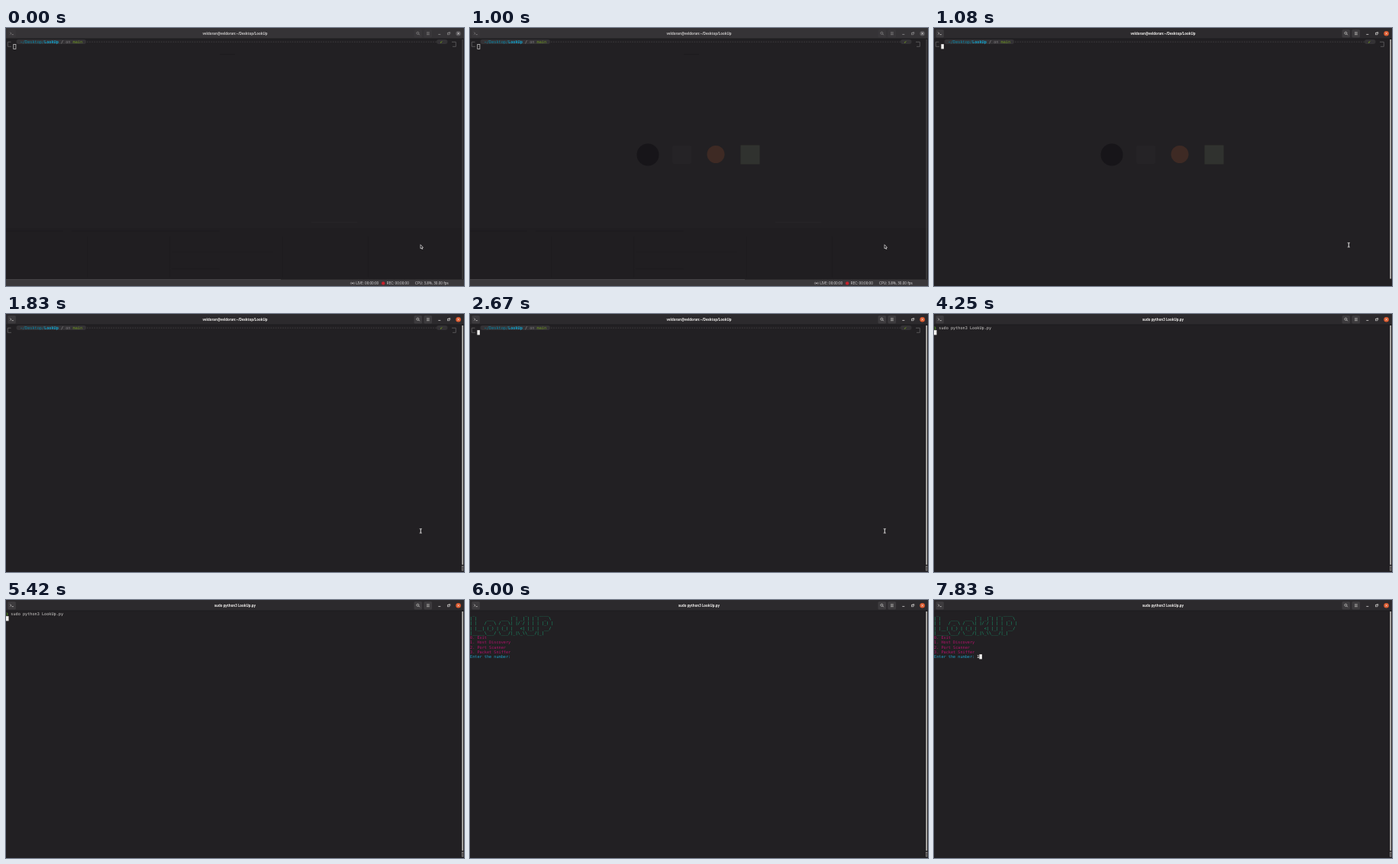
Write an HTML page with a canvas that moves like this. It is 600x338 px and loops after 8 s.

```html
<!DOCTYPE html>
<html lang="en">
<head>
<meta charset="utf-8">
<title>Terminal session</title>
<style>
  html, body { margin: 0; width: 600px; height: 338px; overflow: hidden; background: #222023; }
  canvas { display: block; }
</style>
</head>
<body>
<canvas id="stage" width="600" height="338"></canvas>
<script>
const ctx = document.getElementById('stage').getContext('2d');
const LOOP = 8000;
const CELL_W = 3.125, CELL_H = 6.25, TOP = 14.9;
const BG = '#222023', WHITE = '#e4e2e0';
const MONO = '5.19px "DejaVu Sans Mono", monospace';

// Moments of the session, in ms
const T = { focus: 1080, popup: 1000, popupGone: 1330, hideMouse: 2830,
            command: 3500, enter: 4170, menu: 5670, answer: 7830 };

const BANNER = [
  ' _                _    _   _ ____'.replace(/^ _ {16}/, ' _' + ' '.repeat(16)),
  '| |    ___   ___ | | _| | | |  _ \\',
  '| |   / _ \\ / _ \\| |/ / | | | |_) |',
  '| |__| (_) | (_) |   <| |_| |  __/',
  '|_____\\___/ \\___/|_|\\_\\\\___/|_|'
];
const MENU = ['0. Exit', '1. Host Discovery', '2. Port Scanner', '3. Packet Sniffer'];
const COMMAND = 'sudo python3 LookUp.py';

function rect(x, y, w, h, color) {
  ctx.fillStyle = color;
  ctx.fillRect(x, y, w, h);
}

function round(x, y, w, h, r, color) {
  ctx.fillStyle = color;
  ctx.beginPath();
  ctx.roundRect(x, y, w, h, r);
  ctx.fill();
}

function disc(x, y, r, color) {
  ctx.fillStyle = color;
  ctx.beginPath();
  ctx.arc(x, y, r, 0, Math.PI * 2);
  ctx.fill();
}

function line(color, width, ...points) {
  ctx.strokeStyle = color;
  ctx.lineWidth = width;
  ctx.beginPath();
  for (let i = 0; i < points.length; i += 2) ctx.lineTo(points[i], points[i + 1]);
  ctx.stroke();
}

function label(text, x, y, font, color, align = 'left') {
  ctx.font = font;
  ctx.fillStyle = color;
  ctx.textAlign = align;
  ctx.fillText(text, x, y);
}

// Writes text on the terminal grid
function write(text, col, row, color, bold = false) {
  const y = TOP + row * CELL_H + 4.9;
  [...text].forEach((ch, i) => {
    if (ch !== ' ') label(ch, (col + i) * CELL_W, y, (bold ? 'bold ' : '') + MONO, color);
  });
}

function cursor(col, row, hollow) {
  const x = col * CELL_W, y = TOP + row * CELL_H;
  if (hollow) {
    ctx.strokeStyle = '#c4c2c2';
    ctx.lineWidth = 0.8;
    ctx.strokeRect(x + 0.4, y + 0.4, CELL_W, CELL_H - 0.2);
  } else {
    rect(x, y, CELL_W + 0.4, CELL_H, '#f2f0ee');
  }
}

function header(t) {
  const active = t >= T.focus;
  const button = active ? '#3d3b3e' : '#39373a';
  const ink = active ? '#d6d4d2' : '#8f8d8f';
  rect(0, 0, 600, 14, active ? '#2c2a2d' : '#353336');
  rect(0, 13.6, 600, 0.8, '#1b191c');
  for (const x of [2.3, 534.5, 547.5]) round(x, 2, 10.6, 10.4, 1.5, button);

  line(ink, 0.7, 5.3, 5.5, 6.8, 7, 5.3, 8.5);
  line(ink, 0.7, 7.6, 8.6, 9.8, 8.6);
  ctx.strokeStyle = ink;
  ctx.beginPath();
  ctx.arc(539.4, 6.7, 1.5, 0, Math.PI * 2);
  ctx.stroke();
  line(ink, 0.8, 540.5, 7.8, 541.9, 9.2);
  for (const y of [5.7, 7.2, 8.7]) line(ink, 0.6, 551, y, 554.8, y);

  line(ink, 0.8, 566.3, 8.4, 569.3, 8.4);
  ctx.lineWidth = 0.6;
  ctx.strokeRect(578.6, 6.5, 2.3, 2.3);
  line(ink, 0.6, 579.6, 5.5, 581.9, 5.5, 581.9, 7.8);
  disc(592.6, 7.2, 3.3, active ? '#dc5a2e' : '#58565a');
  line('#f2f0ee', 0.7, 591.4, 6, 593.8, 8.4);
  line('#f2f0ee', 0.7, 593.8, 6, 591.4, 8.4);

  const title = t < T.enter ? 'veldoran@veldoran:~/Desktop/LookUp' : COMMAND;
  label(title, 300, 8.7, 'bold 4.4px "Noto Sans", sans-serif', active ? '#efedeb' : '#c6c4c4', 'center');
}

function prompt() {
  const frame = '#6c6a6d';
  round(13.5, 15.1, 91.5, 6, 3, '#343235');
  round(564, 15.1, 14.5, 6, 3, '#343235');
  write('~/Desktop/', 6, 0, '#078caf');
  write('LookUp', 16, 0, '#10a5d0', true);
  write('/', 23, 0, '#a3a1a3');
  write('on', 25, 0, '#7d7b7e');
  write('main', 28, 0, '#739d20');
  write('✔', 182, 0, '#719b20');
  for (let x = 106; x < 563; x += CELL_W) rect(x, 17.8, 1.7, 0.7, '#4a484b');
  line(frame, 0.7, 6.5, 18.3, 2.3, 18.3, 2.3, 24.3, 7, 24.3);
  line(frame, 0.7, 584, 18.3, 589.3, 18.3, 589.3, 24.3, 585, 24.3);
}

// Traces of the window that sits behind the terminal
function backdrop() {
  const dark = '#1d1b1e';
  rect(0, 262, 600, 67, '#201e21');
  for (const x of [106, 214, 362, 474]) rect(x, 273, 1, 54, dark);
  line(dark, 1, 0, 266, 75, 266);
  line(dark, 1, 86, 266, 280, 266);
  line(dark, 1, 217, 293.5, 350, 293.5);
  line(dark, 1, 217, 315.5, 280, 315.5);
  line(dark, 1, 280, 34.5, 300, 34.5);
  line('#272528', 1, 400, 254.5, 460, 254.5);
  rect(0, 329.5, 600, 8.5, '#3a383b');
  rect(0, 329, 360, 1, '#454346');

  const font = '4.6px "Noto Sans", sans-serif';
  const ink = '#d8d6d8';
  disc(454, 334.4, 0.8, ink);
  ctx.strokeStyle = '#aaa8aa';
  ctx.lineWidth = 0.5;
  for (const r of [1.7, 2.6]) {
    for (const a of [-0.8, Math.PI - 0.8]) {
      ctx.beginPath();
      ctx.arc(454, 334.4, r, a, a + 1.6);
      ctx.stroke();
    }
  }
  label('LIVE: 00:00:00', 458.3, 336.1, font, ink);
  disc(494.2, 334.4, 2.2, '#c8202c');
  label('REC: 00:00:00', 498.8, 336.1, font, ink);
  label('CPU: 3.8%, 30.00 fps', 536, 336.1, font, ink);
}

function switcher(t) {
  if (t < T.popup || t >= T.popupGone) return;
  ctx.globalAlpha = Math.min(1, (T.popupGone - t) / 170);
  disc(233, 166, 14.5, '#171519');
  round(265, 154, 25, 24, 2, '#252326');
  disc(322, 165.5, 11.5, '#3e2a24');
  rect(354.5, 153.5, 25, 25, '#30322f');
  ctx.globalAlpha = 1;
}

function mouse(t) {
  if (t >= T.hideMouse) return;
  if (t >= T.focus) {
    line('#d8d6d6', 0.8, 541.7, 281.4, 544.9, 281.4);
    line('#d8d6d6', 1.1, 543.3, 281.4, 543.3, 287);
    line('#d8d6d6', 0.8, 541.7, 287, 544.9, 287);
    return;
  }
  ctx.beginPath();
  const points = [543, 283.8, 543, 289, 544.2, 288, 545, 289.8, 545.9, 289.3, 545.1, 287.7, 546.5, 287.5];
  for (let i = 0; i < points.length; i += 2) ctx.lineTo(points[i], points[i + 1]);
  ctx.closePath();
  ctx.fillStyle = '#151316';
  ctx.fill();
  ctx.strokeStyle = '#e4e2e2';
  ctx.lineWidth = 0.7;
  ctx.stroke();
}

function scrollbar(t) {
  if (t < T.focus) {
    rect(597.5, 15, 1.2, 314, '#484648');
    return;
  }
  rect(597.3, 15, 1.7, 313.5, '#bab8b4');
  if (t >= T.popupGone) {
    ctx.strokeStyle = '#9a9895';
    ctx.lineWidth = 0.7;
    ctx.strokeRect(597.4, 330.5, 1.6, 5.5);
  }
}

// The cursor flips at each of these times, starting visible
function cursorOn(t) {
  const flips = [1500, 2170, 2830, 3500, 4830, 5420, 6000, 6670, 7250, 7830];
  return flips.filter(f => t >= f).length % 2 === 0;
}

function terminal(t) {
  if (t < T.enter) {
    prompt();
    const typed = t >= T.command ? COMMAND : '';
    write(typed, 3, 1, WHITE);
    if (cursorOn(t)) cursor(3 + typed.length, 1, t < T.focus);
  } else if (t < T.menu) {
    write('❯', 0, 0, '#5fae1c', true);
    write(COMMAND, 2, 0, '#cfcdcb');
    if (cursorOn(t)) cursor(0, 1);
  } else {
    BANNER.forEach((text, row) => write(text, 0, row, '#16a574'));
    MENU.forEach((text, i) => write(text, 0, 5 + i, '#b3126b'));
    write('Enter the number:', 0, 9, '#1fa0c8');
    const answer = t >= T.answer ? '1' : '';
    write(answer, 18, 9, WHITE, true);
    if (cursorOn(t)) cursor(18 + answer.length, 9);
  }
}

function draw() {
  const t = performance.now() % LOOP;
  rect(0, 0, 600, 338, BG);
  if (t < T.focus) backdrop();
  switcher(t);
  header(t);
  terminal(t);
  scrollbar(t);
  mouse(t);
  requestAnimationFrame(draw);
}
draw();
</script>
</body>
</html>
```
